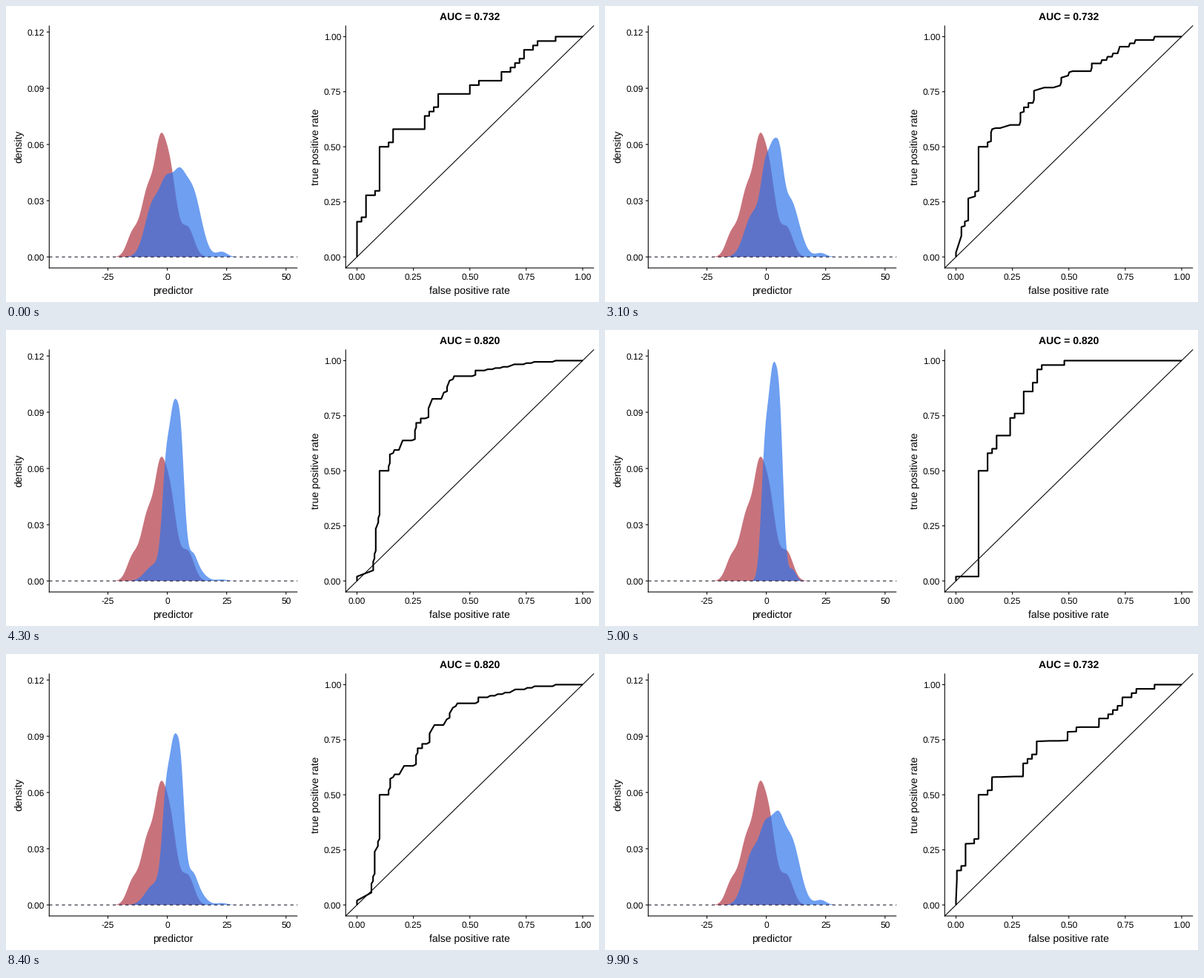
A matplotlib script that plays this animation: 800x400 px, repeating every 10000 ms.

```python
import numpy as np
import matplotlib.pyplot as plt
from matplotlib.animation import FuncAnimation
from matplotlib.patches import Polygon

plt.rcParams["font.family"] = ["Liberation Sans", "DejaVu Sans"]
plt.rcParams["text.hinting"] = "no_hinting"

W, H, DPI = 800, 400, 100
PX = 72 / DPI                      # points per pixel
TOP, BOTTOM, ZERO = 26.4, 354.0, 339.1
LEFT_A, LEFT_B, PANEL = 58.3, 458.3, 334.9
HOLD, MOVE, FRAMES = 25, 25, 100
RED, BLUE, ALPHA = "#b03441", "#2d74ec", 0.69

fig = plt.figure(figsize=(W / DPI, H / DPI), dpi=DPI, facecolor="white")
ax = fig.add_axes([0, 0, 1, 1])
ax.set_xlim(0, W)
ax.set_ylim(H, 0)
ax.axis("off")


def pred_x(v):
    return 217.6 + 3.204 * v


def dens_y(v):
    return ZERO - 2533 * v


def rate_x(v):
    return 473.5 + 304.5 * v


def rate_y(v):
    return ZERO - 297.7 * v


def line(xs, ys, width=1.07, **kw):
    style = dict(color="black", solid_capstyle="butt", snap=False) | kw
    return ax.plot(xs, ys, lw=width * PX, **style)[0]


def label(x, y, text, size=14, **kw):
    style = dict(ha="center", va="baseline", rotation_mode="anchor") | kw
    return ax.text(x, y, text, fontsize=size * PX, **style)


def axes_frame(left, xticks, yticks, xname, yname, yname_x):
    line([left, left], [TOP, BOTTOM + 0.5])
    line([left - 0.5, left + PANEL], [BOTTOM, BOTTOM])
    for x, text in xticks:
        line([x, x], [BOTTOM, BOTTOM + 3.5])
        label(x, 369.6, text, 12)
    for y, text in yticks:
        line([left - 3.5, left], [y, y])
        label(left - 6.2, y + 4.3, text, 12, ha="right")
    label(left + PANEL / 2, 388.7, xname)
    label(yname_x, (TOP + BOTTOM) / 2, yname, rotation=90)


def density(*bumps):
    """Sum of bell curves given as (height in thousandths, centre, spread)."""
    return sum(h * np.exp(-((grid - c) / s) ** 2 / 2) for h, c, s in bumps) / 1000


def roc(treads):
    """Staircase of 1/50 steps; each tread goes right, then up."""
    moves = []
    for right, up in treads:
        moves += [(1, 0)] * right + [(0, 1)] * up
    return np.vstack([(0, 0), np.cumsum(moves, axis=0)]) / 50


def outline(height):
    xs = np.concatenate([grid[:1], grid, grid[-1:]])
    ys = np.concatenate([[0], height, [0]])
    return np.column_stack([pred_x(xs), dens_y(ys)])


def area(height, color):
    return ax.add_patch(Polygon(outline(height), closed=True, fc=color,
                                ec="none", alpha=ALPHA, zorder=1))


grid = np.linspace(-23, 30, 512)
negatives = density((11.5, -14.7, 2.4), (36, -8, 3), (32.5, -3.3, 2.1),
                    (50, 0.6, 3), (15, 8.7, 2.6))
wide = density((28, -6, 3.4), (29.5, -0.4, 2.6), (33, 4.6, 2.8),
               (35, 10.5, 3.7), (2.7, 23, 2.2))
narrow = density((70, -0.4, 1.65), (77, 2.5, 1.5), (92, 5.35, 1.7), (6, 11, 1.5))

step = [(1, 1)]
roc_wide = roc([(0, 8)] + step + [(1, 5), (2, 1), (1, 10), (2, 1), (1, 3), (7, 3)]
               + 2 * step + [(1, 3), (7, 2), (2, 1), (5, 2), (2, 1)]
               + 2 * step + [(1, 2), (2, 1)] + step + [(4, 1), (6, 0)])
roc_narrow = roc([(0, 1), (5, 24), (2, 4)] + step + [(1, 3), (3, 4)] + step
                 + [(2, 5), (2, 2), (1, 3)] + step + [(5, 1), (26, 0)])

area(negatives, RED)
blue = area(wide, BLUE)
line([LEFT_A, LEFT_A + PANEL], [ZERO, ZERO], color="#1d1226", ls=(0, (4, 4)),
     dash_capstyle="butt")
axes_frame(LEFT_A,
           [(pred_x(v), str(v)) for v in range(-25, 51, 25)],
           [(dens_y(v), f"{v:.2f}") for v in np.arange(5) * 0.03],
           "predictor", "density", 21.4)

line([LEFT_B, LEFT_B + PANEL], [BOTTOM, TOP])
curve = line([], [], 2.13, solid_joinstyle="round")
quarters = np.arange(5) / 4
axes_frame(LEFT_B,
           [(rate_x(v), f"{v:.2f}") for v in quarters],
           [(rate_y(v), f"{v:.2f}") for v in quarters],
           "false positive rate", "true positive rate", 422)
title = label(LEFT_B + PANEL / 2, 19, "", weight="bold")


def draw(k):
    # hold wide, move to narrow, hold, move back
    t = np.clip(min(k - HOLD, FRAMES - k) / MOVE, 0, 1)
    blue.set_xy(outline((1 - t) * wide + t * narrow))
    x, y = ((1 - t) * roc_wide + t * roc_narrow).T
    curve.set_data(rate_x(x), rate_y(y))
    shown = roc_narrow if t > 0.5 else roc_wide
    auc = np.sum(np.diff(shown[:, 0]) * shown[1:, 1])
    title.set_text(f"AUC = {auc:.3f}")
    return blue, curve, title


anim = FuncAnimation(fig, draw, frames=FRAMES, interval=100, repeat=True,
                     repeat_delay=0, blit=False)
plt.show()
```
